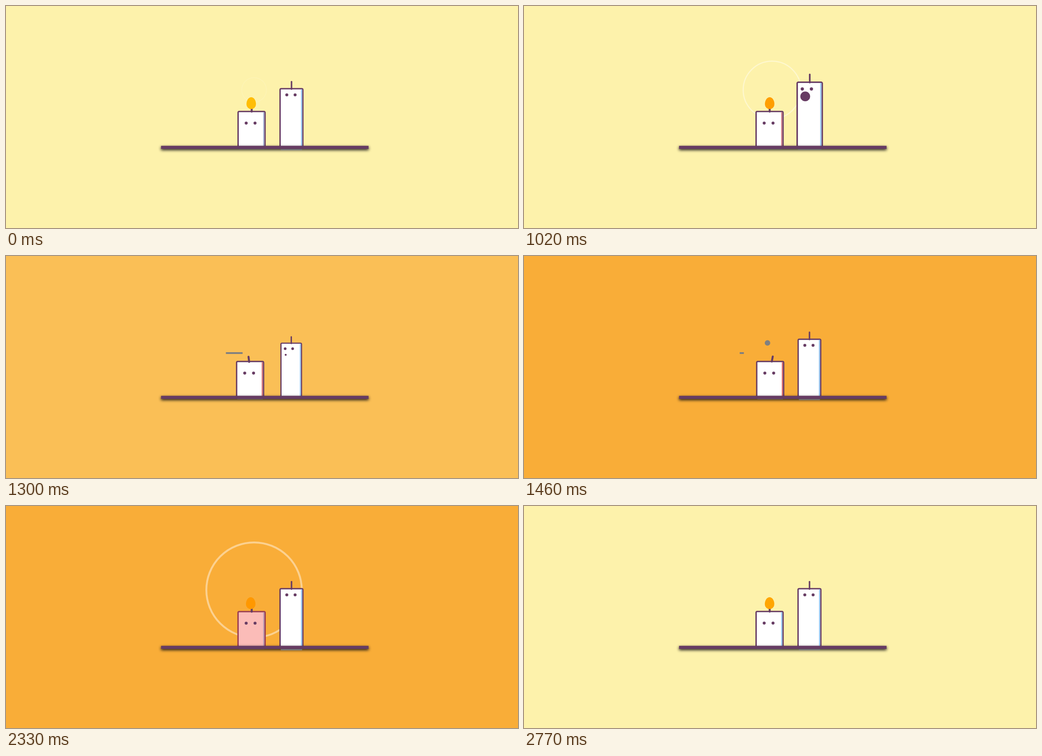
An HTML page with a canvas for the animation above (2.81 s loop, 1135 by 494 pixels).

```html
<!DOCTYPE html>
<html lang="en">
<head>
<meta charset="utf-8">
<title>Two candles</title>
<style>
html, body { margin: 0; width: 100%; height: 100%; overflow: hidden; background: #fdf2ab; }
canvas { display: block; }
</style>
</head>
<body>
<canvas id="stage" width="1135" height="494"></canvas>
<script>
const ctx = document.getElementById('stage').getContext('2d');
const LOOP = 2810;
const UNIT = 1.3143;
const EDGE = 3 / UNIT;
const PLUM = [103, 60, 99], WHITE = [255, 255, 255], RED = [244, 67, 54], BLUE = [149, 198, 242];
const PALE = [253, 242, 171], ORANGE = [249, 173, 56];
const AMBER = [255, 193, 7], DEEP = [255, 152, 0];

const mix = (a, b, k) => Array.isArray(a) ? a.map((v, i) => mix(v, b[i], k)) : a + (b - a) * k;
const css = (c, a = 1) => `rgba(${c.map(Math.round).join()},${a})`;

// Shapes over time: rise, rise-hold-fall, rise-fall.
const ramp = (p, a, b) => Math.min(1, Math.max(0, (p - a) / (b - a)));
const hump = (p, a, b, c, d) => ramp(p, a, b) - ramp(p, c, d);
const peak = (p, a, b, c) => hump(p, a, b, b, c);

// Percent of the cycle; it runs past 100 into the next round.
function progress(t) {
  return 15.4 + 36.2 * ramp(t, 0, 1020) + 8.85 * ramp(t, 1020, 1300) + 53.25 * ramp(t, 1300, LOOP);
}

function dot(x, y, r) {
  ctx.beginPath();
  ctx.arc(x, y, r, 0, Math.PI * 2);
  ctx.fill();
}

function pill(x, y, w, h, r) {
  ctx.beginPath();
  ctx.roundRect(x, y, w, h, r);
  ctx.fill();
}

// Scales about the middle of the right side, then moves by a share of the height.
function place(x, y, w, h, sx, sy, lift) {
  ctx.translate(x + w, y + h / 2);
  ctx.scale(sx, sy);
  ctx.translate(w * .6 - w, h * lift - h / 2);
}

function body(w, h, fill, edge, shade) {
  ctx.fillStyle = css(edge);
  pill(0, 0, w, h, 3);
  ctx.fillStyle = css(fill);
  pill(EDGE, EDGE, w - 2 * EDGE, h, .7);
  ctx.fillStyle = css(shade);
  ctx.fillRect(w - EDGE - 2, EDGE, 2, h - EDGE);
  ctx.fillStyle = css(PLUM);
}

// Each ring: start, single size, double size, outermost, gone.
const RINGS = [[10, 20, 26, 28, 29], [29, 50, 56, 58, 59], [89, 90, 95, 100, 110]];

function wave(p) {
  for (const [start, one, two, out, gone] of RINGS) {
    const left = 1 - ramp(p, out, gone);
    const k = left * (ramp(p, start, one) + ramp(p, one, two) + .5 * ramp(p, two + 1, out));
    const a = left * (.5 * ramp(p, start, two) - .3 * ramp(p, two + 1, out));
    if (k <= 0 || a <= 0) continue;
    ctx.strokeStyle = css(WHITE, a);
    ctx.lineWidth = 2 / UNIT * k;
    ctx.beginPath();
    ctx.arc(106.9, 52.7, 38.3 * k, 0, Math.PI * 2);
    ctx.stroke();
  }
}

function tallCandle(p) {
  const stretch = hump(p, 40, 45, 55, 60);
  const k = 1 + .1 * stretch - .11 * peak(p, 55, 60, 65) - .05 * peak(p, 65, 70, 75);
  const gaze = -3.5 * hump(p, 40, 50, 65, 66);
  const inhale = ramp(p, 40, 50);
  ctx.save();
  place(125.2, 75.2, 40.7, 103, k, k, -.25 - .03 * stretch);
  body(40.7, 103, WHITE, PLUM, BLUE);
  pill(19.2, -12, 2.5, 15, 1.2);
  ctx.globalAlpha = 1 - hump(p, 35, 36, 39, 40);
  dot(12.5 + gaze, 11.5, 2.5);
  dot(26.5 + gaze, 11.5, 2.5);
  ctx.globalAlpha = 1;
  const mouthX = 17 - 3.5 * (inhale + hump(p, 54, 59, 62, 67));
  dot(mouthX, 23, 7.5 * inhale * (1 - ramp(p, 54, 67)) ** 2);
  ctx.restore();
}

function squint(x, y, dir) {
  ctx.strokeStyle = css(PLUM);
  ctx.lineWidth = 2;
  ctx.beginPath();
  ctx.moveTo(x - 6.2 * dir, y - 5);
  ctx.lineTo(x - 1.4 * dir, y);
  ctx.lineTo(x - 6.2 * dir, y + 5);
  ctx.stroke();
}

function shortCandle(p) {
  const blown = peak(p, 59, 62, 65);
  const back = 2.5 * peak(p, 62, 65, 67);
  const squash = .18 * hump(p, 67, 75, 91, 92) - .15 * peak(p, 91, 92, 95) + .05 * peak(p, 92, 95, 97);
  const rage = peak(p, 75, 91, 100);
  ctx.save();
  place(50.2 - 5 * blown + back, 97.5, 47.7, 63, 1 + squash, 1 - squash, -.15 + .05 * peak(p, 75, 91, 92));
  body(47.7, 63, mix(WHITE, RED, rage), mix(PLUM, RED, rage), mix(BLUE, RED, peak(p, 0, 91, 100)));
  if (p > 70.5 && p < 89.5) {
    squint(15.5, 20.5, 1);
    squint(29.5, 20.5, -1);
  } else {
    dot(14.8, 20.8, 2.5);
    dot(29.7, 20.8, 2.5);
  }
  const tilt = -15 * blown + 15 * peak(p, 62, 65, 70) - 5 * peak(p, 65, 70, 72);
  ctx.translate(26, 15);
  ctx.rotate(tilt * Math.PI / 180);
  pill(-3.6, -24, 3.3, 12, 1.6);
  ctx.restore();
}

function fire(p) {
  const k = 1 - hump(p, 58, 59, 89, 90);
  if (k <= 0) return;
  // The flame sways every 8 percent of the cycle.
  const sway = 1 - Math.abs((p % 100 + 1) % 8 / 4 - 1);
  const flare = hump(p, 58, 59, 97, 100);
  const x = 102 + sway - 1.2 * flare;
  ctx.fillStyle = css(mix(AMBER, DEEP, Math.max(sway, flare)));
  ctx.beginPath();
  ctx.ellipse(x, 75 + 2 * k, 8 * k, 12 * k, 0, Math.PI, 0);
  ctx.ellipse(x, 75 + 2 * k, 8 * k, 8 * k, 0, 0, Math.PI);
  ctx.fill();
}

function smoke(p) {
  const w = 30 * peak(p, 59, 60, 68);
  const x = 100 - 25 * (ramp(p, 59, 60) + ramp(p, 60, 68));
  ctx.fillStyle = '#808080';
  ctx.fillRect(x - w / 2, 73.4, w, 3);
  dot(100 - 25 * ramp(p, 65, 100), 60 - 30 * ramp(p, 65, 80), 5 * peak(p, 64, 65, 80));
}

function shelf() {
  ctx.save();
  ctx.shadowColor = '#111';
  ctx.shadowBlur = 5 * UNIT;
  ctx.shadowOffsetY = 2 * UNIT;
  ctx.fillStyle = css(PLUM);
  ctx.fillRect(-50, 147.3, 350, 5.2);
  ctx.restore();
}

function draw(now) {
  const p = progress(now % LOOP);
  ctx.setTransform(1, 0, 0, 1, 0, 0);
  ctx.fillStyle = css(mix(PALE, ORANGE, hump(p, 59, 61, 97, 98)));
  ctx.fillRect(0, 0, 1135, 494);
  ctx.translate(573.7, 314.7);
  ctx.scale(UNIT, UNIT);
  ctx.translate(-125, -150);
  wave(p > 110 ? p - 100 : p);
  tallCandle(p);
  shortCandle(p);
  fire(p);
  smoke(p);
  shelf();
}

const start = performance.now();
function tick() {
  draw(performance.now() - start);
  requestAnimationFrame(tick);
}
tick();
</script>
</body>
</html>
```
